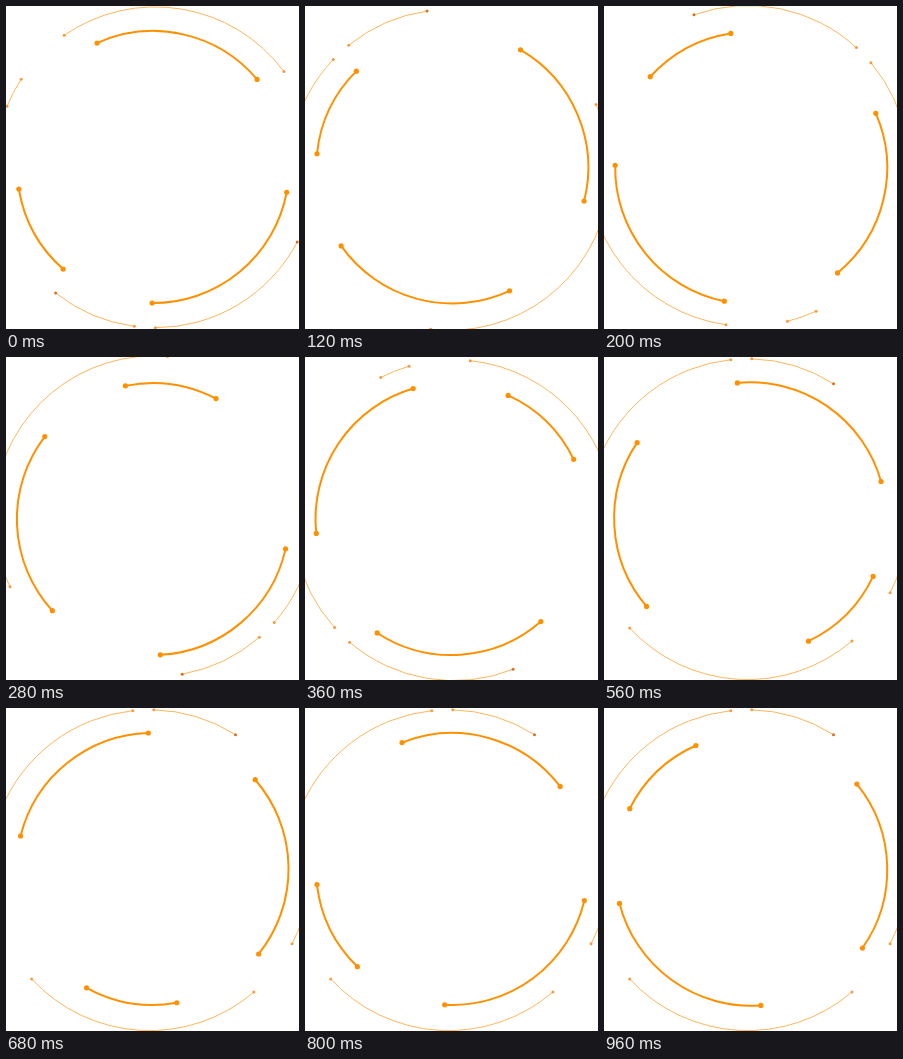
An HTML page with a canvas for the animation above (1 s loop, 293 by 323 pixels).

```html
<!DOCTYPE html>
<html lang="en">
<head>
<meta charset="utf-8">
<title>Rotating arcs</title>
<style>
  html, body { margin: 0; width: 100%; height: 100%; overflow: hidden; background: #fff; }
  canvas { display: block; width: 293px; height: 323px; }
</style>
</head>
<body>
<canvas id="stage"></canvas>
<script>
const LOOP = 1000, STEP = 40;
const W = 293, H = 323;
const canvas = document.getElementById('stage');
const ctx = canvas.getContext('2d');
const scale = window.devicePixelRatio || 1;
canvas.width = W * scale;
canvas.height = H * scale;
ctx.scale(scale, scale);

const rad = deg => deg * Math.PI / 180;

// Each ring turns about a pivot slightly off its own centre.
// Arcs are [start, end, start dot colour, end dot colour], in degrees.
const inner = {
  x: 146.7, y: 161.5, off: 0.6, offAngle: -54, r: 136,
  line: 2, dot: 2.6, color: '#ff9100',
  arcs: [[245.7, 319.9], [10.7, 90.4], [131.4, 170.7]]
};
const outer = {
  x: 146.4, y: 161.6, off: 2.9, offAngle: -6, r: 160.4,
  line: 1, dot: 1.5, color: '#ffb65c', dotColor: '#f79b40',
  arcs: [
    [235.4, 323.3],
    [27.8, 90, '#d9711c'],
    [97.5, 128.4, '#f79b40', '#d9711c'],
    [202.4, 213.3]
  ]
};

function drawRing(ring, turn) {
  const a = rad(ring.offAngle + turn);
  const cx = ring.x + ring.off * Math.cos(a);
  const cy = ring.y + ring.off * Math.sin(a);
  const dot = (angle, color) => {
    ctx.fillStyle = color || ring.dotColor || ring.color;
    ctx.beginPath();
    ctx.arc(cx + ring.r * Math.cos(angle), cy + ring.r * Math.sin(angle), ring.dot, 0, 2 * Math.PI);
    ctx.fill();
  };
  ctx.strokeStyle = ring.color;
  ctx.lineWidth = ring.line;
  for (const [start, end, startColor, endColor] of ring.arcs) {
    const from = rad(start + turn), to = rad(end + turn);
    ctx.beginPath();
    ctx.arc(cx, cy, ring.r, from, to);
    ctx.stroke();
    dot(from, startColor);
    dot(to, endColor);
  }
}

// Steady spin until 440 ms, then a cubic stop at 560 ms.
function outerTurn(t) {
  const speed = 44.5 / STEP;
  if (t <= 440) return speed * t;
  const u = Math.min(1, (t - 440) / 120);
  return speed * 440 + 44.5 * (1 - (1 - u) ** 3);
}

function draw(now) {
  const t = Math.floor((now % LOOP) / STEP) * STEP;
  ctx.fillStyle = '#fff';
  ctx.fillRect(0, 0, W, H);
  drawRing(outer, outerTurn(t));
  drawRing(inner, 18.136 * t / STEP);
}

let begin = null;
function tick(now) {
  if (begin === null) begin = now;
  draw(now - begin);
  requestAnimationFrame(tick);
}
draw(0);
requestAnimationFrame(tick);
</script>
</body>
</html>
```
